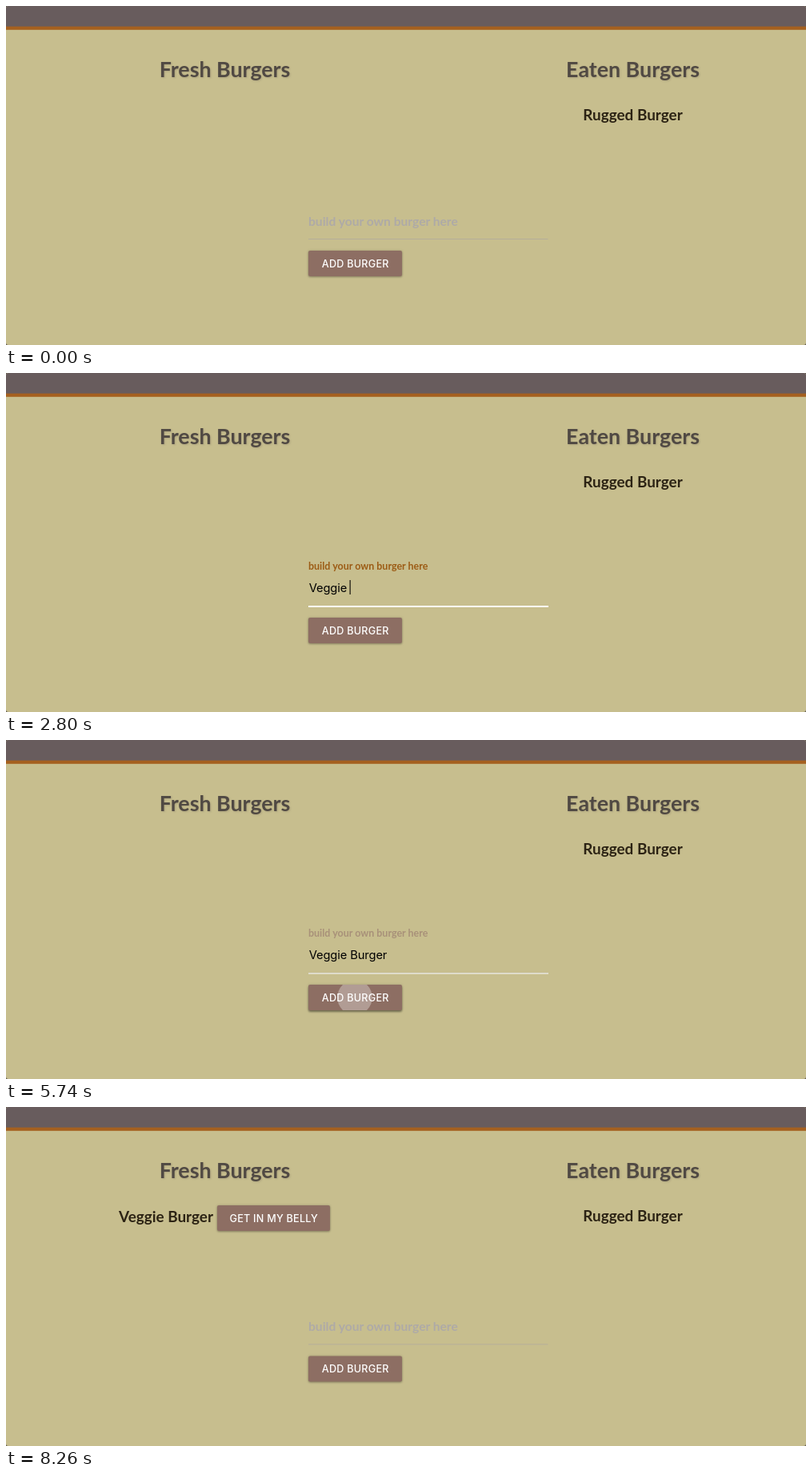
Recreate the animation shown at these times as an HTML page. Size 1000 px wide and 424 px high, loop 8330 ms.

```html
<!DOCTYPE html>
<html lang="en">
<head>
<meta charset="utf-8">
<title>Burger list</title>
<style>
  html, body { margin: 0; width: 100%; height: 100%; overflow: hidden; background: #55504a; }
  svg { display: block; width: 100%; height: 100%; }
  text { white-space: pre; }
  .display { font-family: Lato, sans-serif; font-weight: 700; }
  .heading { font-size: 26.8px; fill: #504943; text-anchor: middle; filter: drop-shadow(1px 1px 1px rgba(70, 60, 60, .2)); }
  .item { font-size: 18.9px; fill: #2c2314; }
  .label { font-size: 15.6px; }
  .typed { font: 14.7px Inter, sans-serif; letter-spacing: -.1px; fill: #000; }
  .button { --drop: 1.5px; --depth: .25; }
  .button rect {
    fill: #8d6e63;
    filter: drop-shadow(0 var(--drop) 1px rgba(0, 0, 0, var(--depth))) drop-shadow(0 .6px 1.6px rgba(0, 0, 0, .18));
  }
  .button text { font: 500 12.6px Inter, sans-serif; letter-spacing: .25px; fill: #fff; text-anchor: middle; }
</style>
</head>
<body>
<svg viewBox="0 0 1000 424">
  <defs>
    <clipPath id="window"><rect width="1000" height="424" rx="3"/></clipPath>
    <clipPath id="face"><rect x="378" y="306" width="117" height="32" rx="2"/></clipPath>
  </defs>
  <g clip-path="url(#window)">
    <rect width="1000" height="424" fill="#c7be8e"/>
    <rect width="1000" height="26" fill="#685c5d"/>
    <rect y="25.6" width="1000" height="4.2" fill="#a5601f"/>

    <text class="display heading" x="273.5" y="89">Fresh Burgers</text>
    <text class="display heading" x="783.5" y="89">Eaten Burgers</text>
    <text class="display item" x="783.5" y="143" text-anchor="middle">Rugged Burger</text>

    <g id="fresh">
      <text class="display item" x="259" y="144" text-anchor="end">Veggie Burger</text>
      <g class="button">
        <rect x="264" y="123" width="141" height="32" rx="2"/>
        <text x="334.8" y="144">GET IN MY BELLY</text>
      </g>
    </g>

    <g id="form">
      <text id="label" class="display label">build your own burger here</text>
      <text id="typed" class="typed" x="378.7" y="273.8"></text>
      <rect id="caret" y="259" width="1.2" height="18" fill="#17130c"/>
      <rect x="378" y="291" width="299.5" height="1" fill="#b5ae9b"/>
      <rect id="underline" x="378" y="291" width="300" height="2" fill="#fff"/>
      <g class="button" id="add">
        <rect x="378" y="306" width="117" height="32" rx="2"/>
        <g clip-path="url(#face)"><circle id="ripple" cx="436" cy="322" fill="#fff"/></g>
        <text x="436.7" y="327">ADD BURGER</text>
      </g>
    </g>
  </g>
</svg>
<script>
const LOOP = 8330;
const FOCUS = 980, HOVER = 4900, BLUR = 5530, PRESS = 5600, ADDED = 6510;
const WORD = "Veggie Burger";
const KEY_TIMES = [1820, 2030, 2170, 2450, 2590, 2660, 2800, 3220, 3430, 3570, 3780, 3920, 4060];
const CARET_ON = [[910, 1610], [1820, 4550], [5040, BLUR]];
const GRAY = [174, 170, 167], ORANGE = [156, 92, 21];

const [fresh, form, label, typed, caret, underline, add, ripple] =
  ["fresh", "form", "label", "typed", "caret", "underline", "add", "ripple"]
    .map(id => document.getElementById(id));

const progress = (t, start, length) => Math.min(1, Math.max(0, (t - start) / length));
const easeOut = p => 1 - (1 - p) ** 1.65;
const mix = (a, b, p) => a + (b - a) * p;
const show = (node, on) => node.setAttribute("visibility", on ? "visible" : "hidden");

// Rises after focus and falls again after blur.
const focusLevel = (t, length) =>
  easeOut(progress(t, FOCUS, length)) - easeOut(progress(t, BLUR, length));

function drawLabel(t, added) {
  const lift = added ? 0 : easeOut(progress(t, FOCUS, 420));
  const tint = focusLevel(t, 420);
  label.setAttribute("transform",
    `translate(378 ${mix(274.5, 246.2, lift)}) scale(${mix(1, .8, lift)})`);
  label.setAttribute("fill", `rgb(${GRAY.map((c, i) => mix(c, ORANGE[i], tint))})`);
}

function drawInput(t, added) {
  const count = added ? 0 : KEY_TIMES.filter(k => k <= t).length;
  const value = WORD.slice(0, count);
  if (typed.textContent !== value) typed.textContent = value;
  show(caret, CARET_ON.some(([from, to]) => t >= from && t < to));
  caret.setAttribute("x", 378 + (count ? typed.getComputedTextLength() : 0));
  underline.setAttribute("opacity", focusLevel(t, 630));
}

function drawButton(t, added) {
  const raise = added ? 0 : easeOut(progress(t, HOVER, 490));
  add.style.setProperty("--drop", mix(1.5, 2.2, raise) + "px");
  add.style.setProperty("--depth", mix(.25, .38, raise));
  const spread = added ? 0 : progress(t, PRESS, 630);
  ripple.setAttribute("r", 64 * easeOut(spread));
  ripple.setAttribute("opacity", .47 * Math.min(1, spread * 3));
}

function render(t) {
  const added = t >= ADDED;
  show(fresh, added);
  form.setAttribute("transform", `translate(0 ${added ? 5.4 : 0})`);
  drawLabel(t, added);
  drawInput(t, added);
  drawButton(t, added);
}

const started = performance.now();
function tick() {
  render((performance.now() - started) % LOOP);
  requestAnimationFrame(tick);
}
tick();
</script>
</body>
</html>
```
